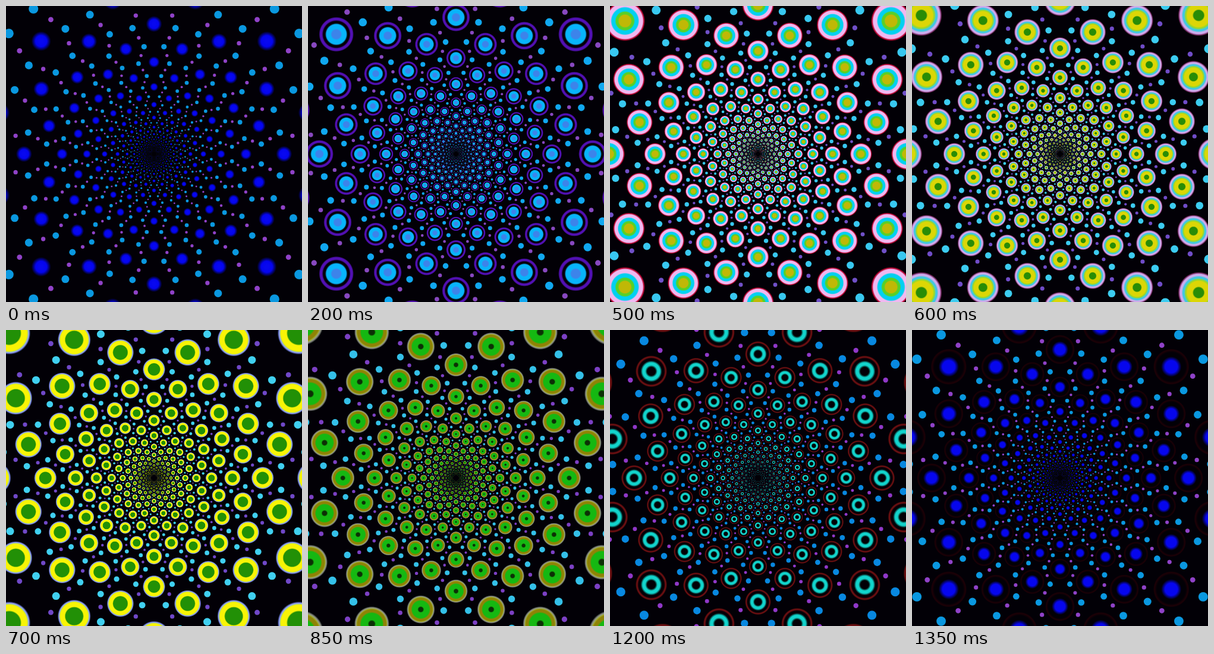
Recreate the animation shown at these times as an HTML page with a canvas. Size 498x498 px, loop 1.4 s.

```html
<!DOCTYPE html>
<html lang="en">
<head>
<meta charset="utf-8">
<title>Dot tunnel</title>
<style>
html, body { margin: 0; width: 100%; height: 100%; overflow: hidden; background: #020006; }
canvas { display: block; }
</style>
</head>
<body>
<canvas id="stage" width="498" height="498"></canvas>
<script>
const ctx = document.getElementById('stage').getContext('2d');
const LOOP = 1400, STEP = 50, MID = 249, TAU = Math.PI * 2;
const GAP = 0.152;      // log distance between neighbouring rings
const RINGS = 26;
const rad = deg => deg * Math.PI / 180;

// Each key: time, edge softness, outer radii of seven bands, their colours, two dot colours
const keys = [
  [0, .14, [0, 0, 0, .22, .48, .85, 1], '000 000 4488e8 0808f0 0404ee 000000 000000', '0a98e0 9042c8'],
  [200, .04, [0, 0, 0, .3, .62, .81, 1], '000 000 6a90c8 3c84ea 08b4fa 040008 5210b4', '10a8f0 8848c0'],
  [500, .03, [0, 0, .34, .5, .73, .97, 1.04], '000 308800 c0b800 58d028 00d0f0 f0b8f0 c00838', '38c8f0 7050c8'],
  [700, .03, [0, .57, .89, .91, .94, .97, 1.01], '186000 229000 f8f400 d0e040 80c0d0 a8a0e8 5060b0', '40d0f0 7048c8'],
  [1000, .05, [.4, .77, .88, .91, .94, .97, 1.01], '000000 08e024 241208 7c7010 8c8412 8c8412 605c0c', '28b0e0 8838c0'],
  [1200, .07, [.34, .64, .91, .93, .95, .98, 1.02], '000000 12d4cc 040004 5c0c10 701012 701012 480a0c', '0888e0 9038c8'],
  [1350, .13, [0, .52, 1.03, 1.04, 1.06, 1.09, 1.12], '000000 0606ee 000000 180004 1c0006 1c0006 100004', '0a98e0 9042c8'],
  [1400, .14, [0, .48, .85, .88, .92, .96, 1], '000000 0404ee 000000 000000 000000 000000 000000', '0a98e0 9042c8']
].map(([at, soft, radii, bands, dots]) => ({ at, soft, radii, bands: parse(bands), dots: parse(dots) }));

function parse(list) {
  return list.split(' ').map(hex => {
    const n = parseInt(hex, 16);
    return [n >> 16, n >> 8 & 255, n & 255];
  });
}
const lerp = (a, b, k) => a + (b - a) * k;
const mix = (a, b, k) => 'rgb(' + a.map((v, i) => Math.round(lerp(v, b[i], k))).join(',') + ')';

function lookAt(time) {
  const n = keys.findIndex(key => key.at > time);
  const a = keys[n - 1], b = keys[n], k = (time - a.at) / (b.at - a.at);
  return {
    soft: lerp(a.soft, b.soft, k),
    radii: a.radii.map((r, i) => lerp(r, b.radii[i], k)),
    bands: a.bands.map((c, i) => mix(c, b.bands[i], k)),
    dots: a.dots.map((c, i) => mix(c, b.dots[i], k))
  };
}

function bandFill({ soft, radii, bands }) {
  const size = 1.25, fill = ctx.createRadialGradient(0, 0, 0, 0, 0, size);
  let inner = 0;
  radii.forEach((outer, i) => {
    const width = outer - inner;
    if (width < .004) return;
    const edge = Math.min(soft, width / 2);
    fill.addColorStop((inner ? inner + edge : 0) / size, bands[i]);
    fill.addColorStop((outer - edge) / size, bands[i]);
    inner = outer;
  });
  fill.addColorStop((inner + .03) / size, 'rgb(0,0,0)');
  return fill;
}

// The tunnel flares towards its rim
const flare = (u, reach, power) => u * (1 + Math.pow(u / reach, power));

function spot(r, deg, size, reach) {
  const x = MID + r * Math.sin(rad(deg)), y = MID - r * Math.cos(rad(deg));
  ctx.setTransform(size, 0, 0, size, x, y);
  ctx.beginPath();
  ctx.arc(0, 0, reach, 0, TAU);
  ctx.fill();
}

function draw(time) {
  const p = time / LOOP, look = lookAt(time), big = bandFill(look);
  const start = Math.log(206.6) + 2 * GAP * p - .0055 * Math.sin(TAU * p);

  ctx.setTransform(1, 0, 0, 1, 0, 0);
  ctx.globalCompositeOperation = 'source-over';
  ctx.globalAlpha = 1;
  ctx.fillStyle = '#020006';
  ctx.fillRect(0, 0, 498, 498);
  ctx.globalCompositeOperation = 'lighten';

  for (let n = RINGS; n >= -5; n--) {
    const u = Math.exp(start - n * GAP), turn = n & 1 ? 15 : 0;
    const rBig = flare(u, 388, 4.5);
    const rCyan = flare(u, 463, 4);
    const rPurple = flare(u * Math.exp(GAP / 2), 463, 4);
    ctx.globalAlpha = Math.min(1, .25 + u / 45);
    for (let i = 0; i < 12; i++) {
      const deg = turn + i * 30;
      ctx.fillStyle = look.dots[1];
      spot(rPurple, deg + 7.5, rPurple * .0155, 1);
      spot(rPurple, deg - 7.5, rPurple * .0155, 1);
      ctx.fillStyle = look.dots[0];
      spot(rCyan, deg + 9.7, rCyan * .0253, 1);
      spot(rCyan, deg - 9.7, rCyan * .0253, 1);
      ctx.fillStyle = big;
      spot(rBig, deg, rBig * .1, 1.2);
    }
  }
}

let shown = -1;
const begin = performance.now();
function tick() {
  const time = Math.floor((performance.now() - begin) % LOOP / STEP) * STEP;
  if (time !== shown) draw(shown = time);
  requestAnimationFrame(tick);
}
tick();
</script>
</body>
</html>
```
